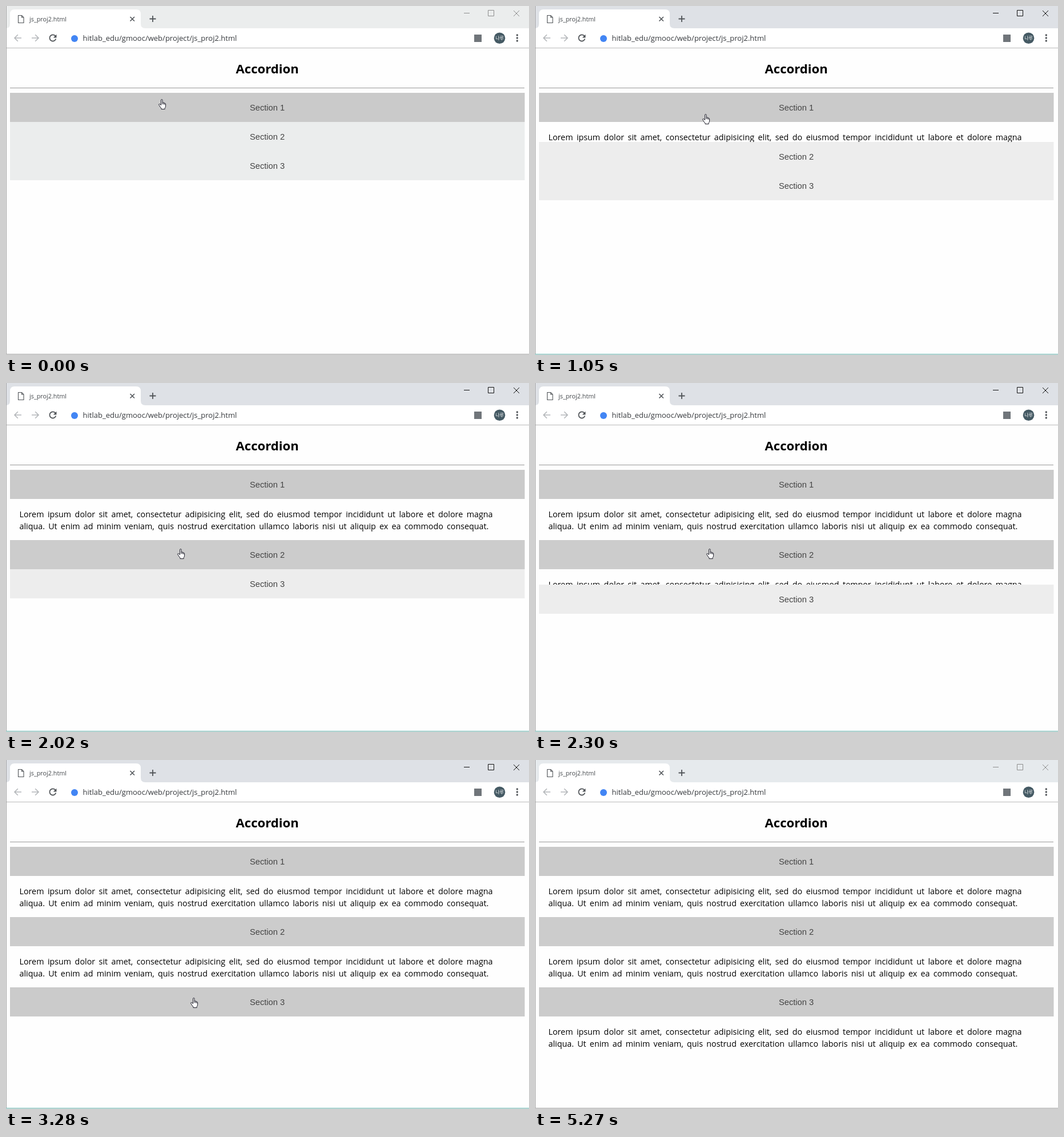
Recreate the animation shown at these times as an HTML page. Size 916 by 611 pixels, loop 5370 ms.

```html
<!DOCTYPE html>
<html lang="en">
<head>
<meta charset="utf-8">
<title>Accordion</title>
<style>
  html, body { margin: 0; width: 100%; height: 100%; overflow: hidden; background: #fefefe; }
  svg { display: block; }
  text { font-family: "Open Sans", "Noto Sans", sans-serif; }
  .label { font: 14.7px "Liberation Sans", Arial, sans-serif; fill: #444; text-anchor: middle; }
  .body { font-size: 14.3px; word-spacing: 2.75px; fill: #000; }
  .body + .body { word-spacing: 2.5px; }
  .icon { fill: none; stroke: #505458; stroke-width: 1.6; }
  .cursor { fill: #fff; stroke: #1c1c28; stroke-width: 1; stroke-linejoin: round; }
</style>
</head>
<body>
<svg id="stage" width="916" height="611" viewBox="0 0 916 611">
  <rect width="916" height="611" fill="#fefefe"/>

  <!-- Tab strip -->
  <rect id="strip" width="916" height="39"/>
  <path d="M0 39Q7 39 7 31V14Q7 6 15 6H228Q236 6 236 14V31Q236 39 244 39Z" fill="#fff"/>
  <path d="M21.5 16.5H27.5L31 20V29.5H21.5ZM27.5 16.5V20H31" class="icon" style="stroke-width:1.1"/>
  <text x="41" y="27" font-size="10.8" fill="#45494d">js_proj2.html</text>
  <path d="M217.5 19L225 26.5M225 19L217.5 26.5" class="icon"/>
  <path d="M251.5 22.5H262.5M257 17V28" class="icon" style="stroke-width:1.8"/>
  <path id="controls" d="M802 12.5H812M844.5 7.5H854.5V17.5H844.5ZM889 8L899 18M899 8L889 18" fill="none"/>

  <!-- Toolbar -->
  <rect y="39" width="916" height="34" fill="#fff"/>
  <rect y="73" width="916" height="1" fill="#b9b9b9"/>
  <g class="icon" style="stroke:#b4b7ba">
    <path d="M27 56H15.5M20.8 50.3L15 56L20.8 61.7"/>
    <path d="M45 56H56.5M51.2 50.3L57 56L51.2 61.7"/>
  </g>
  <path d="M86.6 52.6A5.6 5.6 0 1 0 87.4 57.6" class="icon" style="stroke-width:1.8"/>
  <path d="M88.5 49.8V55.5H82.8Z" fill="#505458"/>
  <circle cx="120" cy="57" r="6" fill="#4285f4"/>
  <text x="134.5" y="61" font-size="13.03" fill="#36393d">hitlab_edu/gmooc/web/project/js_proj2.html</text>
  <rect x="820" y="50" width="13" height="13" fill="#70757a"/>
  <circle cx="864.5" cy="56.3" r="9.8" fill="#455a64"/>
  <text x="864.5" y="59.2" font-size="8" fill="#fff" text-anchor="middle" style="font-family:'Noto Sans CJK KR','Noto Sans CJK',sans-serif">나루</text>
  <g fill="#505458">
    <circle cx="895.3" cy="51" r="1.7"/><circle cx="895.3" cy="56" r="1.7"/><circle cx="895.3" cy="61" r="1.7"/>
  </g>

  <!-- Page -->
  <text x="457.7" y="118" font-size="22.1" font-weight="700" text-anchor="middle">Accordion</text>
  <rect x="7" y="143" width="901" height="1" fill="#979797"/>
  <g id="sections"></g>
  <rect width="1" height="611" fill="#a6a6a6"/>
  <rect y="610" width="916" height="1" fill="#e0e0e0"/>
  <rect id="edge" y="609" width="916" height="1"/>

  <g id="hand" class="cursor">
    <path d="M4.6 10.6V1.9Q4.6.5 5.8.5Q7 .5 7 1.9V6.3Q7.3 5.4 8.2 5.6Q9 5.8 9 6.8Q9.5 6.1 10.2 6.4Q10.9 6.7 10.9 7.7Q11.5 7.1 12.1 7.6Q12.6 8 12.6 9V12.3Q12.6 14.3 11.2 15.7V17.6H5V16Q3 14 1.9 11.9L.8 10Q.3 9 1.2 8.6Q2 8.2 2.9 9.1Z"/>
    <path d="M7 6.3V9M9 6.8V9.3M10.9 7.7V9.8" fill="none"/>
  </g>
  <path id="arrow" class="cursor" d="M.5.5V12.2L3.2 9.7L5.1 14.2L7 13.4L5.1 9H8.9Z"/>
</svg>

<script>
const LOOP = 5370;
const TOP = 152, BAR = 51, PANEL = 72;
const LINES = [
  "Lorem ipsum dolor sit amet, consectetur adipisicing elit, sed do eiusmod tempor incididunt ut labore et dolore magna",
  "aliqua. Ut enim ad minim veniam, quis nostrud exercitation ullamco laboris nisi ut aliquip ex ea commodo consequat."
];

// Each track lists [start time, ...values]; a value holds until the next start.
const windowTrack = [
  [0, "#ebeded", "#8e8e8e", "#a9a9a9", "#ebeded"],
  [790, "#e6eaed", "#111", "#6fbfba", "#ededed"],
  [910, "#dee1e6", "#111", "#6fbfba", "#ededed"],
  [5270, "#e6eaed", "#8e8e8e", "#a9a9a9", "#ededed"]
];
const openTracks = [
  [[0, 0], [1050, 35], [1170, PANEL]],
  [[0, 0], [2300, 27], [2450, PANEL]],
  [[0, 0], [3780, PANEL]]
];
const shadeTracks = [
  [[0, "#cacaca"]],
  [[0, null], [1870, "#cccccc"]],
  [[0, null], [3010, "#dcdcdc"], [3130, "#cbcbcb"]]
];
const cursorTrack = [
  [0, "hand", 267, 163], [130, "hand", 276, 171], [250, "hand", 285, 179],
  [400, "hand", 288, 190], [520, "hand", 291, 200], [640, "hand", 293, 189],
  [1450, "hand", 295, 190], [1600, "arrow", 303, 232], [1720, "arrow", 309.5, 272],
  [1870, "hand", 301, 291], [2020, "hand", 300, 290],
  [2730, "arrow", 315, 345], [2860, "arrow", 326, 396],
  [3010, "hand", 323, 406], [3130, "hand", 322, 415], [3280, "hand", 323, 416],
  [3920, "hand", 325, 419], [4070, "arrow", 422, 457],
  [4220, "arrow", 688, 585], [4340, "none", 0, 0]
];

const $ = id => document.getElementById(id);

function add(parent, tag, attrs, text = "") {
  const node = document.createElementNS("http://www.w3.org/2000/svg", tag);
  set(node, attrs);
  node.textContent = text;
  return parent.appendChild(node);
}

function set(node, attrs) {
  for (const key in attrs) node.setAttribute(key, attrs[key]);
}

function at(track, t) {
  return track.filter(step => step[0] <= t).pop().slice(1);
}

const sections = openTracks.map((_, i) => {
  const group = add($("sections"), "g", {});
  const bar = add(group, "rect", { x: 7, width: 901.5, height: BAR });
  add(group, "text", { x: 457.6, y: 31, class: "label" }, `Section ${i + 1}`);
  const panel = add(group, "svg", { y: BAR, width: 916, overflow: "hidden" });
  LINES.forEach((line, n) => add(panel, "text", { x: 23.5, y: 32 + 21 * n, class: "body" }, line));
  return { group, bar, panel };
});

function draw(t) {
  const [strip, ink, edge, idle] = at(windowTrack, t);
  set($("strip"), { fill: strip });
  set($("controls"), { stroke: ink });
  set($("edge"), { fill: edge });

  let y = TOP;
  sections.forEach(({ group, bar, panel }, i) => {
    const [open] = at(openTracks[i], t);
    const [shade] = at(shadeTracks[i], t);
    set(group, { transform: `translate(0 ${y})` });
    set(bar, { fill: shade || idle });
    set(panel, { height: open });
    y += BAR + open;
  });

  const [kind, cx, cy] = at(cursorTrack, t);
  for (const id of ["hand", "arrow"]) {
    set($(id), { display: id === kind ? "inline" : "none", transform: `translate(${cx} ${cy})` });
  }
}

const start = performance.now();
function tick() {
  draw((performance.now() - start) % LOOP);
  requestAnimationFrame(tick);
}
tick();
</script>
</body>
</html>
```
